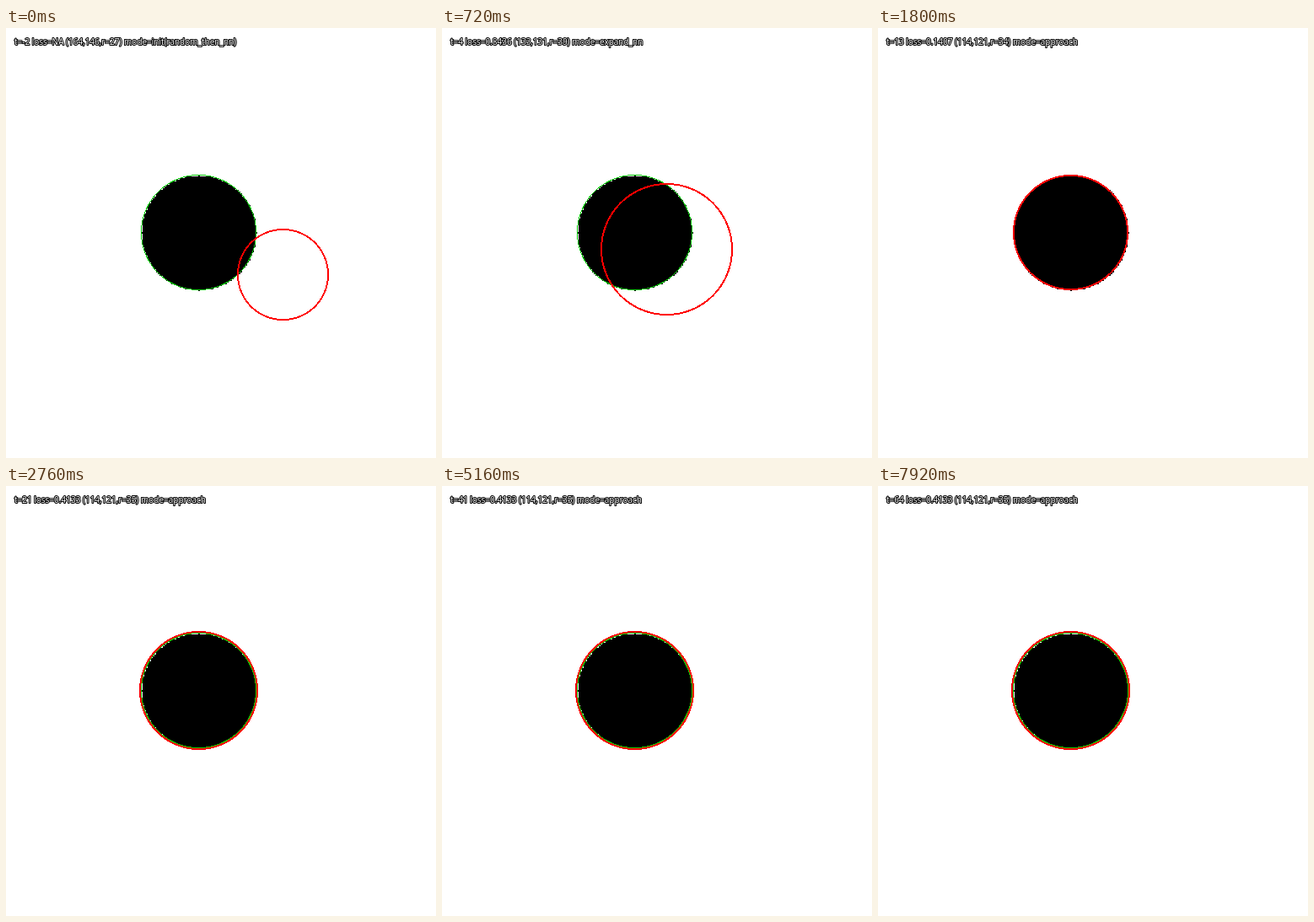
An HTML page with a canvas that plays this animation: 510 px wide and 510 px high, repeating every 8 s.

```html
<!DOCTYPE html>
<html lang="en">
<head>
<meta charset="utf-8">
<title>Circle fitting</title>
<style>
  html, body { margin: 0; width: 100%; height: 100%; overflow: hidden; background: #fff; }
  canvas { display: block; width: 510px; height: 510px; }
</style>
</head>
<body>
<canvas id="stage" width="510" height="510"></canvas>
<script>
const ctx = document.getElementById('stage').getContext('2d');
const LOOP = 8000, STEP = 120, SCALE = 2;
const goal = { x: 114, y: 121, r: 34 };

// Aliased ring: every pixel whose distance lies within the line.
function ring({ x, y, r }, width, color) {
  const cx = x * SCALE, cy = y * SCALE, R = r * SCALE;
  const outer = (R + 0.5) ** 2, inner = (R + 0.5 - width) ** 2;
  ctx.fillStyle = color;
  for (let dy = -R; dy <= R; dy++) {
    for (let dx = -R; dx <= R; dx++) {
      const d = dx * dx + dy * dy;
      if (d <= outer && d > inner) ctx.fillRect(cx + dx, cy + dy, 1, 1);
    }
  }
}

// Solid disc built from coarse cells.
function disc({ x, y, r }) {
  ctx.fillStyle = '#000';
  for (let dy = -r; dy <= r; dy++) {
    const half = Math.floor(Math.sqrt(r * r - dy * dy));
    ctx.fillRect((x - half) * SCALE, (y + dy) * SCALE, (2 * half + 1) * SCALE, SCALE);
  }
}

function stateAt(t) {
  if (t === -2) return { x: 164, y: 146, r: 27, loss: 'NA', mode: 'init(random_then_nn)' };

  // The centre walks six units per step along the slope 1:2 until it arrives.
  const walked = 6 * (t + 1) / Math.sqrt(5);
  const x = Math.round(Math.max(goal.x, 160 - 2 * walked));
  const y = Math.round(Math.max(goal.y, 144 - walked));
  const expanding = t <= 6;
  const r = expanding ? 35 + t : t <= 13 ? 47 - t : 35;
  const loss = expanding ? 0.8436 + 0.0717 * (t - 4) : 0.4133 + 0.27257 * (r - 35);
  return {
    x, y, r,
    loss: t < 0 ? 'NA' : loss.toFixed(4),
    mode: t < 0 ? 'init(random_then_nn)' : expanding ? 'expand_nn' : 'approach'
  };
}

function label(text) {
  ctx.font = '10px "Open Sans", "Noto Sans", sans-serif';
  ctx.lineWidth = 2;
  ctx.lineJoin = 'round';
  ctx.strokeStyle = '#000';
  ctx.fillStyle = '#fff';
  ctx.strokeText(text, 10, 19.6);
  ctx.fillText(text, 10, 19.6);
}

function draw(t) {
  const s = stateAt(t);
  ctx.fillStyle = '#fff';
  ctx.fillRect(0, 0, 510, 510);
  disc(goal);
  ring(goal, 1, '#00c800');
  ring(s, 2, '#f00');
  label(`t=${t} loss=${s.loss} (${s.x},${s.y},r=${s.r}) mode=${s.mode}`);
}

const start = performance.now();
let shown = null;
function tick() {
  const t = Math.floor((performance.now() - start) % LOOP / STEP) - 2;
  if (t !== shown) draw(shown = t);
  requestAnimationFrame(tick);
}
tick();
</script>
</body>
</html>
```
